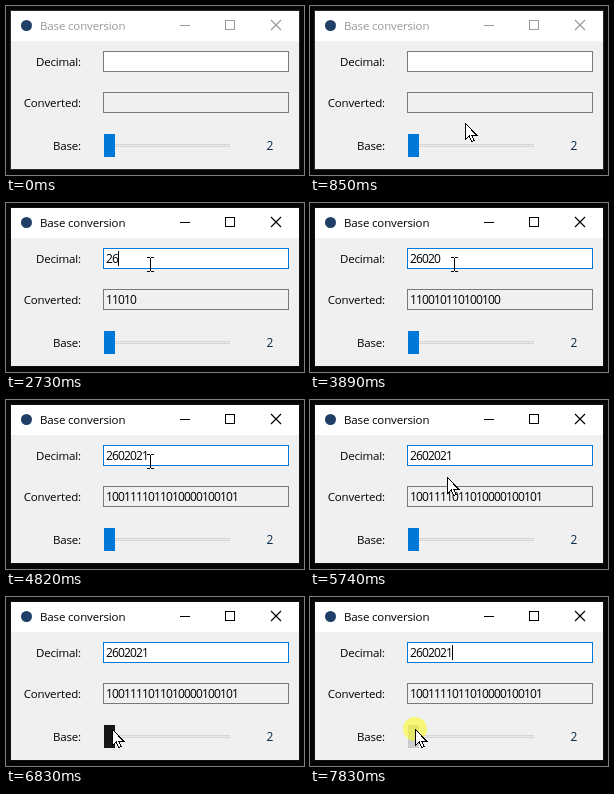
Write an HTML page that moves like this. It is 298 by 169 pixels and loops after 8000 ms.

```html
<!DOCTYPE html>
<html lang="en">
<head>
<meta charset="utf-8">
<title>Base conversion</title>
<style>
  html, body { margin: 0; width: 100%; height: 100%; overflow: hidden; background: #050507; }
  svg { display: block; width: 298px; height: 169px; }
  rect, line, #arrow { shape-rendering: crispEdges; }
  text { font: 11.5px "Open Sans", "Noto Sans", sans-serif; letter-spacing: -.15px; white-space: pre; }
  .digits { font-size: 12px; letter-spacing: -.864px; }
  .label { text-anchor: end; }
  .box { stroke: #7a7a7a; }
</style>
</head>
<body>
<svg viewBox="0 0 298 169">
  <rect width="298" height="169" fill="#050507"/>
  <rect id="frame" x="4.5" y="4.5" width="289" height="159" fill="#f0f0f0"/>
  <rect x="5" y="5" width="288" height="30" fill="#fff"/>

  <circle cx="20.5" cy="19.5" r="5.5" fill="#1f3f66"/>
  <text id="title" x="34" y="24">Base conversion</text>
  <g id="buttons" fill="none">
    <line x1="174" y1="19.5" x2="184" y2="19.5"/>
    <rect x="219.5" y="14.5" width="9" height="9"/>
    <path d="M265 14l10 10m0-10l-10 10" stroke-width="1.2"/>
  </g>

  <text class="label" x="75" y="60">Decimal:</text>
  <text class="label" x="75" y="101">Converted:</text>
  <text class="label" x="75" y="144">Base:</text>

  <rect id="decimalBox" class="box" x="97.5" y="45.5" width="185" height="20" fill="#fff"/>
  <text id="decimal" class="digits" x="100" y="60"></text>
  <rect id="caret" y="48" width="1" height="15"/>
  <rect id="convertedBox" class="box" x="97.5" y="86.5" width="185" height="20" fill="#f0f0f0"/>
  <text id="converted" class="digits" x="100" y="101"></text>

  <rect x="98.5" y="138.5" width="125" height="2" fill="#e7eaea" stroke="#d6d6d6"/>
  <rect id="thumb" x="98" y="128" width="11" height="23"/>
  <text class="digits" x="260.5" y="144" fill="#0a2a4a">2</text>

  <circle id="press" r="12" fill="#ff0" opacity=".5"/>
  <path id="arrow" d="M.5 .5V16.5L4.2 13 6.8 18.5 9 17.5 6.7 12H11.5Z" fill="#fff" stroke="#000"/>
  <path id="beam" d="M-3 -6.5H0M1 -6.5H4M.5 -6V7M-3 7.5H0M1 7.5H4" fill="none" stroke="#000"/>
</svg>
<script>
  const LOOP = 8000, TICK = 70;
  const ENTER = 630, FOCUS = 1480, RELEASE = 1580, GRAB = 7400;

  const NUMBER = "2602021", TYPE_START = 2450, KEY_GAP = 280;
  const BREAK_AFTER = 5, BREAK = 390;
  const CARET_ON = 600, CARET_PERIOD = 900;

  // Each move starts where the last one ended
  const HOME = { x: 160, y: 146 };
  const MOVES = [
    { from: ENTER, to: 1140, x: 146, y: 67 },
    { from: 1220, to: 1430, x: 144, y: 61 },
    { from: 5460, to: 6320, x: 116, y: 128 },
    { from: 6320, to: 6900, x: 105, y: 132 },
  ];

  const el = {};
  document.querySelectorAll("[id]").forEach(e => el[e.id] = e);
  const set = (e, name, value) => e.setAttribute(name, value);
  const show = (e, on) => set(e, "visibility", on ? "visible" : "hidden");
  const ease = f => (1 - Math.cos(Math.PI * f)) / 2;

  // The pointer is redrawn once per tick
  function pointer(t) {
    let { x, y } = HOME;
    for (const m of MOVES) {
      const elapsed = Math.max(0, t - m.from);
      const ticked = Math.floor(elapsed / TICK) * TICK;
      const f = t >= m.to ? 1 : ease(ticked / (m.to - m.from));
      x += (m.x - x) * f;
      y += (m.y - y) * f;
    }
    return [Math.round(x), Math.round(y)];
  }

  function typedAt(t) {
    const due = i => TYPE_START + i * KEY_GAP + (i >= BREAK_AFTER ? BREAK : 0);
    return [...NUMBER].filter((_, i) => t >= due(i)).join("");
  }

  function render(t) {
    const active = t >= FOCUS;
    const entered = t >= ENTER;
    const [x, y] = pointer(t);
    const over = (left, top, right, bottom) =>
      entered && x >= left && x < right && y >= top && y < bottom;
    const onDecimal = over(97, 45, 283, 66);
    const onConverted = over(97, 86, 283, 107);
    const onThumb = over(98, 128, 109, 151);
    const typed = typedAt(t);

    set(el.frame, "stroke", active ? "#101012" : "#2b2b2d");
    set(el.title, "fill", active ? "#000" : "#999");
    set(el.buttons, "stroke", active ? "#000" : "#999");

    const border = hover => hover ? "#171717" : "#7a7a7a";
    el.decimalBox.style.stroke = active ? "#0078d7" : border(onDecimal);
    el.convertedBox.style.stroke = border(onConverted);
    el.decimal.textContent = typed;
    el.converted.textContent = typed && Number(typed).toString(2);
    set(el.caret, "x", 100 + 6 * typed.length);
    show(el.caret, active && (t - FOCUS) % CARET_PERIOD < CARET_ON);

    set(el.thumb, "fill", t >= GRAB ? "#ccc" : onThumb ? "#171717" : "#0078d7");

    const beam = onDecimal || onConverted;
    [el.press, el.arrow, el.beam].forEach(e => set(e, "transform", `translate(${x} ${y})`));
    show(el.press, active && t < RELEASE || t >= GRAB);
    show(el.arrow, entered && !beam);
    show(el.beam, entered && beam);
  }

  const start = performance.now();
  function loop() {
    render((performance.now() - start) % LOOP);
    requestAnimationFrame(loop);
  }
  loop();
</script>
</body>
</html>
```
